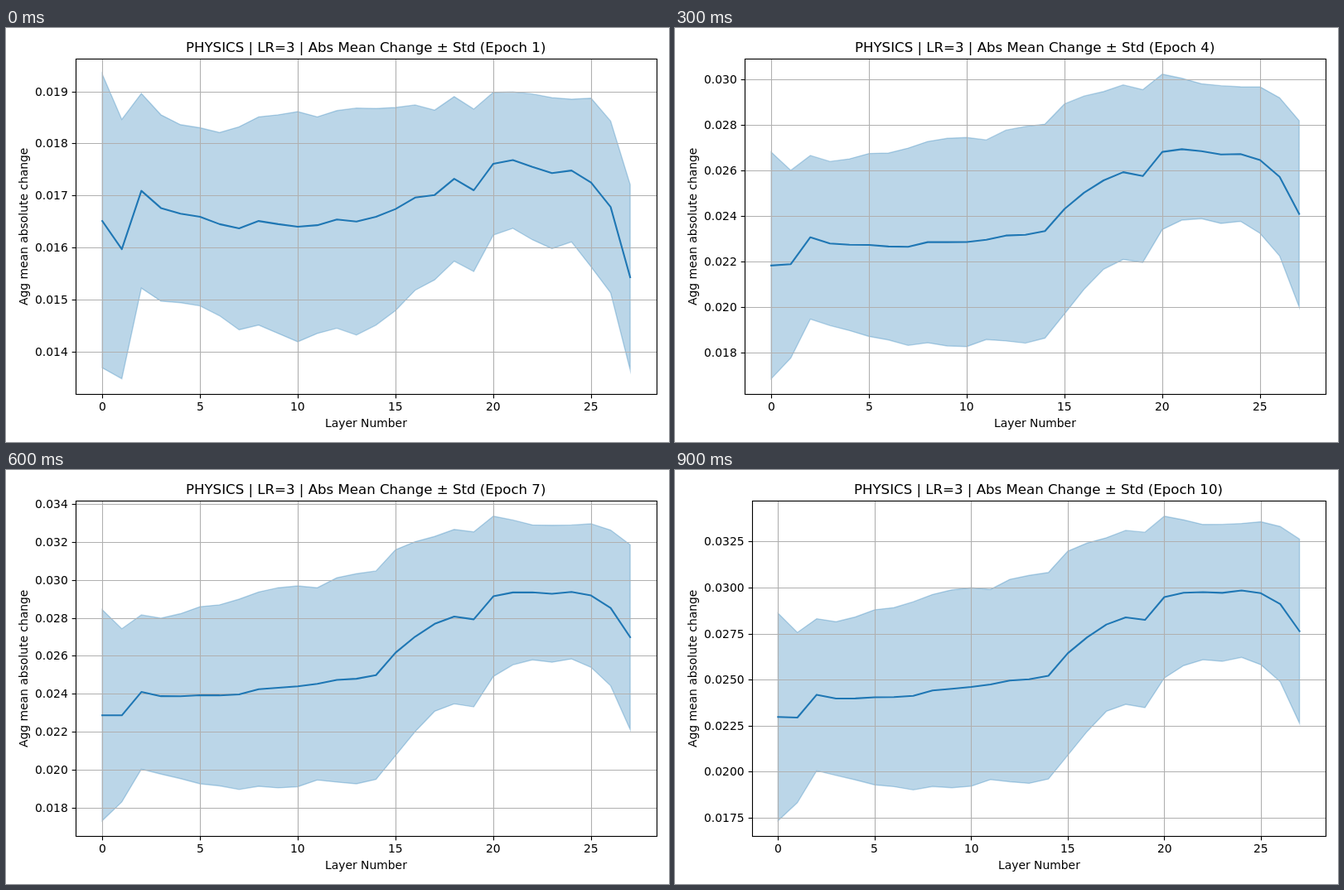
Write an HTML page with a canvas that moves like this. It is 800 px wide and 500 px high and loops after 1000 ms.

```html
<!DOCTYPE html>
<html lang="en">
<head>
<meta charset="utf-8">
<title>Abs Mean Change per Epoch</title>
<style>
html, body { margin: 0; width: 100%; height: 100%; overflow: hidden; background: #fff; }
canvas { display: block; }
</style>
</head>
<body>
<canvas id="chart" width="800" height="500"></canvas>
<script>
const ctx = document.getElementById('chart').getContext('2d');
const TOP = 37.4, BOTTOM = 442, RIGHT = 785, LAST = 27;
const BLUE = '#1f77b4', GRID = '#b0b0b0';

// Profiles of the first epoch by layer, in units of 1e-5.
const firstMean = [1651, 1597, 1709, 1676, 1665, 1659, 1645, 1637, 1651, 1645, 1640, 1643, 1654, 1650,
  1659, 1674, 1696, 1701, 1732, 1710, 1761, 1768, 1755, 1743, 1748, 1725, 1678, 1543];
const firstStd = [282, 249, 187, 179, 171, 171, 176, 195, 200, 210, 221, 208, 209, 218,
  208, 195, 178, 163, 158, 156, 137, 131, 140, 145, 137, 162, 165, 178];

// Total growth and speed of settling, as [layer, value] key points.
const meanGrowth = [[0, 646], [1, 697], [5, 745], [10, 820], [14, 862], [15, 969], [17, 1098],
  [19, 1114], [20, 1187], [22, 1220], [25, 1244], [27, 1220]];
const stdGrowth = [[0, 281], [1, 213], [3, 238], [5, 304], [9, 327], [11, 308], [12, 340], [15, 359],
  [17, 308], [19, 320], [20, 302], [22, 227], [25, 226], [26, 256], [27, 322]];
const meanRate = [[0, 1.12], [1, 1.22], [10, 1], [20, 0.965], [25, 0.87], [27, 0.8]];
const stdRate = [[0, 1.08], [17, 1], [20, 0.86], [27, 0.95]];

// Share of the growth still to come at each epoch.
const remaining = [1, 0.576, 0.349, 0.213, 0.122, 0.063, 0.0255, 0.0065, 0.0013, 0];

function along(keys, x) {
  const n = Math.max(1, keys.findIndex(k => k[0] >= x));
  const [x0, y0] = keys[n - 1], [x1, y1] = keys[n];
  return y0 + (y1 - y0) * (x - x0) / (x1 - x0);
}

function curves(epoch) {
  const done = (rate, i) => 1 - remaining[epoch - 1] ** along(rate, i);
  const mean = firstMean.map((v, i) => v + along(meanGrowth, i) * done(meanRate, i));
  const std = firstStd.map((v, i) => v + along(stdGrowth, i) * done(stdRate, i) ** 1.28);
  return {
    mean,
    upper: mean.map((v, i) => v + std[i]),
    lower: mean.map((v, i) => v - std[i])
  };
}

const snap = v => Math.round(v) + 0.5;

function line(x1, y1, x2, y2, color) {
  ctx.strokeStyle = color;
  ctx.lineWidth = 1.11;
  ctx.beginPath();
  ctx.moveTo(x1, y1);
  ctx.lineTo(x2, y2);
  ctx.stroke();
}

// Text starts on a whole pixel; anchor 0.5 centres it, 1 puts its end at x.
function text(s, x, y, anchor = 0.5, size = 13.89) {
  ctx.font = `${size}px "DejaVu Sans", sans-serif`;
  ctx.fillText(s, Math.round(x - ctx.measureText(s).width * anchor), y);
}

function draw(epoch) {
  const { mean, upper, lower } = curves(epoch);
  const max = Math.max(...upper), min = Math.min(...lower);
  const pad = (max - min) * 0.05, hi = max + pad, lo = min - pad;
  const step = [100, 200, 250, 500].find(s => s >= (hi - lo) / 9);
  const digits = step === 250 ? 4 : 3;
  const left = digits === 4 ? 92.9 : 84.3;
  const center = (left + RIGHT) / 2;
  const px = i => left + (RIGHT - left) / 1.1 * (0.05 + i / LAST);
  const py = v => TOP + (hi - v) / (hi - lo) * (BOTTOM - TOP);
  const trace = values => values.forEach((v, i) => ctx.lineTo(px(i), py(v)));
  const l = snap(left), r = snap(RIGHT - 0.5), t = snap(TOP), b = snap(BOTTOM - 0.1);

  ctx.fillStyle = '#fff';
  ctx.fillRect(0, 0, 800, 500);

  // Deviation band
  ctx.globalAlpha = 0.3;
  ctx.fillStyle = ctx.strokeStyle = BLUE;
  ctx.lineWidth = 1.39;
  ctx.lineJoin = 'miter';
  ctx.beginPath();
  trace(upper);
  for (let i = LAST; i >= 0; i--) ctx.lineTo(px(i), py(lower[i]));
  ctx.closePath();
  ctx.fill();
  ctx.stroke();
  ctx.globalAlpha = 1;

  // Grid, ticks and tick labels
  ctx.fillStyle = '#000';
  for (let i = 0; i <= 25; i += 5) {
    const x = snap(px(i));
    line(x, t, x, b, GRID);
    line(x, b, x, b + 4.86, '#000');
    text(i, px(i), 462);
  }
  for (let v = Math.ceil(lo / step) * step; v <= hi; v += step) {
    const y = snap(py(v));
    line(l, y, r, y, GRID);
    line(l - 4.86, y, l, y, '#000');
    text((v / 1e5).toFixed(digits), left - 9.7, Math.round(py(v)) + 5, 1);
  }

  // Mean curve
  ctx.strokeStyle = BLUE;
  ctx.lineWidth = 2.08;
  ctx.lineJoin = 'round';
  ctx.lineCap = 'square';
  ctx.beginPath();
  trace(mean);
  ctx.stroke();
  ctx.lineCap = 'butt';

  ctx.strokeStyle = '#000';
  ctx.lineWidth = 1.11;
  ctx.lineJoin = 'miter';
  ctx.strokeRect(l, t, r - l, b - t);

  // Titles
  text(`PHYSICS | LR=3 | Abs Mean Change ± Std (Epoch ${epoch})`, center - 0.5, 29, 0.5, 16.6);
  text('Layer Number', center, 482);
  ctx.save();
  ctx.translate(26, 240);
  ctx.rotate(-Math.PI / 2);
  text('Agg mean absolute change', 0, 0);
  ctx.restore();
}

function frame() {
  draw(Math.floor(performance.now() % 1000 / 100) + 1);
  requestAnimationFrame(frame);
}
frame();
</script>
</body>
</html>
```
